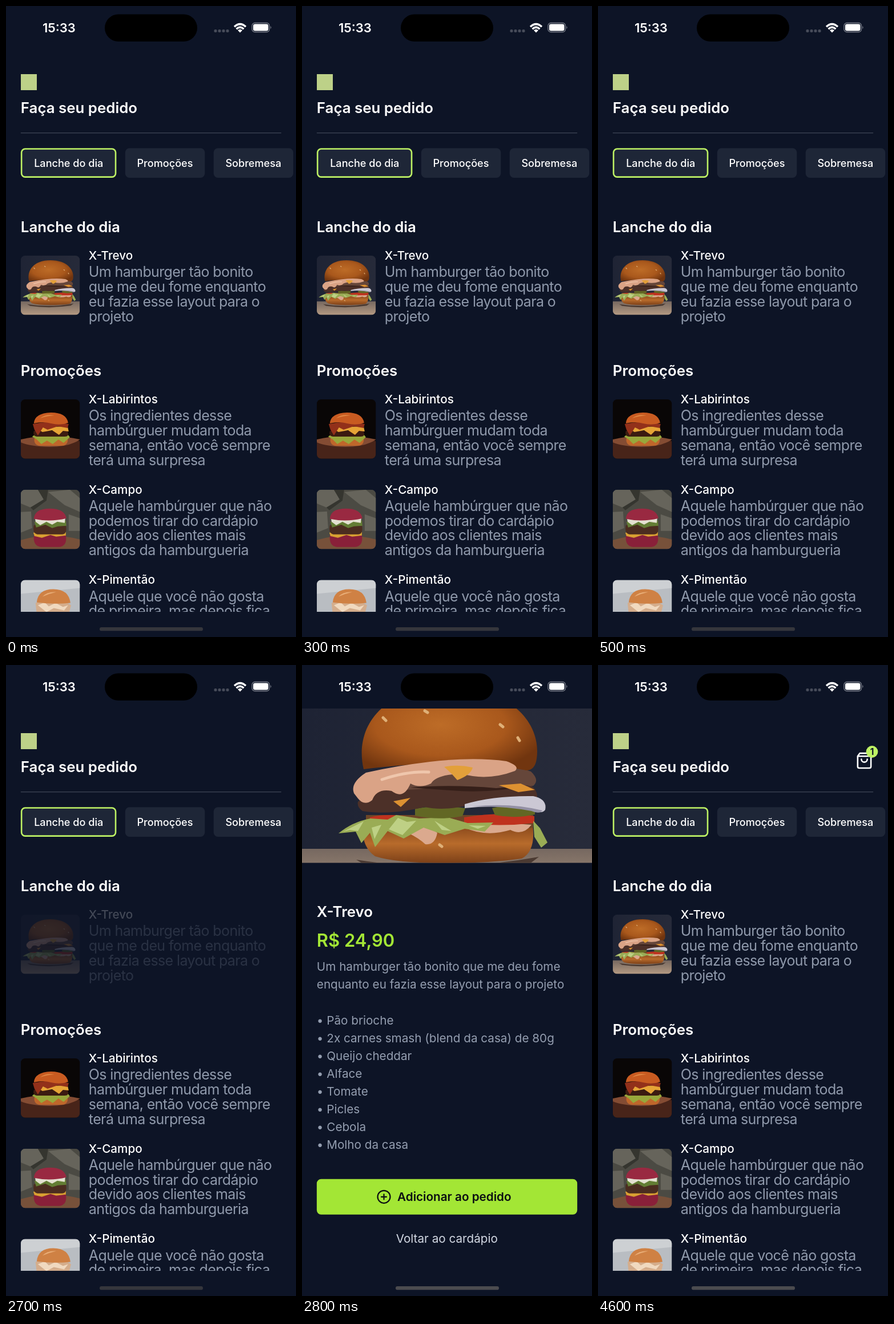
Recreate the animation shown at these times as an HTML page. Size 508 px wide and 1102 px high, loop 6.2 s.

```html
<!DOCTYPE html>
<html lang="pt-BR">
<head>
<meta charset="utf-8">
<title>Cardápio</title>
<style>
html, body { margin: 0; width: 100%; height: 100%; overflow: hidden; background: #0d1426; }
svg { display: block; }
text { font-family: Inter, sans-serif; font-optical-sizing: none; fill: #fff; white-space: pre; }
.h { font-size: 25.85px; font-weight: 600; }
.name { font-size: 20.68px; font-weight: 500; }
.tab { font-size: 18.1px; font-weight: 500; }
.desc { font-size: 25px; font-weight: 400; letter-spacing: -.62px; fill: #8f99ab; }
.body { font-size: 20.68px; fill: #949eb0; }
</style>
</head>
<body>
<svg id="stage" width="100%" height="100%" viewBox="0 0 508 1102"></svg>
<script>
const text = (x, y, cls, str, attrs = '') => `<text x="${x}" y="${y}" class="${cls}" ${attrs}>${str}</text>`;
const rect = (x, y, w, h, fill, r = 0, attrs = '') =>
  `<rect x="${x}" y="${y}" width="${w}" height="${h}" rx="${r}" fill="${fill}" ${attrs}/>`;
const path = (fill, d) => `<path fill="${fill}" d="${d}"/>`;
const lines = (x, y, step, cls, list) => list.map((s, i) => text(x, y + i * step, cls, s)).join('');

const left = 25.85;

const defs = `<defs>
  <clipPath id="thumb">${rect(0, 0, 103.4, 103.4, '#fff', 7.75)}</clipPath>
  <clipPath id="list">${rect(0, 330, 508, 728, '#fff')}</clipPath>
  <clipPath id="hero">${rect(0, 76, 508, 269.5, '#fff')}</clipPath>
  <radialGradient id="bun" cx=".45" cy=".45" r=".62">
    <stop stop-color="#bd6c27"/><stop offset=".6" stop-color="#a9581c"/><stop offset="1" stop-color="#71350f"/>
  </radialGradient>
  <linearGradient id="heel" x2="0" y2="1"><stop stop-color="#84451a"/><stop offset=".5" stop-color="#b86b2b"/><stop offset="1" stop-color="#7c4018"/></linearGradient>
  <linearGradient id="wall"><stop stop-color="#1e2334"/><stop offset="1" stop-color="#272b3a"/></linearGradient>
  <linearGradient id="table" x2="0" y2="1"><stop stop-color="#766860"/><stop offset="1" stop-color="#b89d84"/></linearGradient>
</defs>`;

const mainBurger = [
  rect(0, 0, 508, 330, 'url(#wall)'),
  rect(0, 321, 508, 100, 'url(#table)'),
  path('#4b3a32', 'M95 340Q250 365 415 335L395 350Q250 372 115 352Z'),
  path('url(#heel)', 'M106 278H404Q410 325 385 338Q330 346 250 346Q165 346 128 334Q104 318 106 278Z'),
  path('#6d4527', 'M112 262H405V284Q340 293 290 284Q200 298 112 282Z'),
  path('#dba98e', 'M180 285Q215 276 237 293Q233 315 216 313Q204 302 187 294ZM285 284Q350 274 402 279Q387 299 365 288Q322 301 285 284Z'),
  path('#bf321e', 'M119 266Q145 259 182 264L166 277Q137 279 119 274ZM284 266Q350 255 407 264V276Q345 283 284 276Z'),
  path('#9aac55', 'M64 294Q88 274 120 268L150 270L165 262L205 268L255 266L290 276L335 275L320 291L285 286L250 297L213 284L178 303L150 290L128 318L119 293L104 311L94 291ZM405 272L417 285L430 310L419 319L407 300Z'),
  path('#bed085', 'M72 291L108 273L98 290L84 288ZM152 287L168 267L184 274L200 272L176 297ZM232 272L262 290L245 288ZM292 280L322 281L308 286ZM122 284L139 279L127 304Z'),
  path('#626724', 'M198 251Q242 243 286 250L281 264Q239 272 198 263ZM333 250Q371 240 408 248V261Q373 269 338 262Z'),
  path('#4c3028', 'M98 239Q130 208 200 204L370 200Q414 207 412 232Q375 244 300 243Q250 256 215 248Q150 263 106 255Q96 248 98 239Z'),
  path('#65463a', 'M122 207Q180 179 280 183Q370 174 401 186Q417 201 405 211Q330 219 230 214Q160 224 122 207Z'),
  path('#351f19', 'M190 214Q260 208 340 215L400 210Q330 225 260 219Z'),
  path('#dd9131', 'M345 210L383 207L408 218L379 222ZM160 238L190 232L173 248Z'),
  path('#cbc8d4', 'M285 243Q335 228 405 229Q430 234 426 253Q420 261 402 254Q345 243 285 250Z'),
  path('#9390a4', 'M300 247Q365 240 421 254Q416 261 402 255Q355 246 300 247Z'),
  path('url(#bun)', 'M108 182C91 111 138 39 255 39C370 39 420 105 411 164Q408 184 393 184Q275 161 108 182Z'),
  path('#daa386', 'M91 224Q84 206 112 188Q165 176 224 169Q300 160 358 168Q383 177 373 185Q325 203 280 190Q235 191 226 207Q206 216 190 207Q178 236 157 220Q131 215 123 236Q109 247 98 233Z'),
  path('#e3a03a', 'M249 178Q273 173 299 179Q296 192 272 201Q260 187 249 178Z'),
  '<path d="M140 200Q185 185 222 187" fill="none" stroke="#efc6ac" stroke-width="5" stroke-linecap="round"/>',
  '<path d="M142 92l5 5M215 80l5 3M347 104l5 4M378 127l3 5M241 314l4 3" stroke="#dfb078" stroke-width="5" stroke-linecap="round"/>'
].join('');

const photos = [
  `<svg width="103.4" height="103.4" viewBox="51 7.5 406 406">${mainBurger}</svg>`,
  rect(0, 0, 104, 104, '#090606') +
    path('#482419', 'M0 73Q50 57 104 73V104H0Z') + path('#844c33', 'M0 70Q50 58 104 70Q85 83 50 83Q16 82 0 75Z') +
    path('#bf672b', 'M24 68H82Q84 80 72 81H34Q22 80 24 68Z') +
    path('#98a73b', 'M20 65L31 57H79L86 66L75 76L66 70L56 78L46 72L36 78L28 70Z') +
    path('#3b1b11', 'M23 55H82Q86 65 77 65H28Q20 64 23 55Z') +
    path('#e6a436', 'M25 49L82 47L84 56L74 55L67 62L55 54L38 57Z') +
    path('#92301a', 'M21 43Q52 36 84 43L82 50L65 47L47 53L39 49L30 63L24 53Z') +
    path('#c85b21', 'M23 42Q24 24 53 23Q80 23 83 41Q69 46 53 42Q39 38 23 42Z') +
    path('#e38b46', 'M34 33Q44 25 59 28Q44 29 34 33Z'),
  rect(0, 0, 104, 104, '#4b4a43') +
    path('#66645b', 'M0 0H30L42 18L17 31L0 24ZM48 4L86 0L104 15V39L77 27ZM0 39L18 38L20 67L0 75ZM84 43L104 50V72H84Z') +
    path('#35352f', 'M30 0H48L45 19L22 36L17 31L40 17Z') +
    path('#77513a', 'M0 88Q50 73 104 87V104H0Z') +
    path('#892039', 'M23 79H79Q82 99 67 100H35Q21 98 23 79Z') +
    path('#d9a032', 'M22 75L79 74L79 80L62 82L52 79L37 84L24 81Z') +
    path('#4b2d20', 'M23 62Q51 56 79 62Q82 77 73 78H29Q20 76 23 62Z') +
    path('#637d34', 'M24 56L79 54L80 63L65 64L55 67L43 61L27 66Z') +
    path('#e4e1d1', 'M25 50H78L77 58L64 56L55 61L45 56L34 62L26 56Z') +
    path('#992941', 'M23 51Q24 33 51 33Q77 33 80 50Q52 57 23 51Z'),
  rect(0, 0, 104, 104, '#b9bdc2') + path('#cdd0d3', 'M0 0H104V14L0 24Z') +
    path('#d4ad8c', 'M26 40L45 34L74 35L88 44L84 60H28Z') +
    path('#f0d9bf', 'M30 44L42 39L49 46L61 40L74 47L83 44L76 53L58 49L45 56Z') +
    path('#cf8144', 'M28 39Q30 16 57 16Q84 16 87 40Q57 43 28 39Z') +
    path('#e9ae78', 'M38 29Q46 20 62 21Q49 24 38 29Z')
];

const item = (i, y, name, desc) => `<g id="item${i}" transform="translate(${left} ${y})">
  <g clip-path="url(#thumb)">${photos[i]}</g>
  ${text(119, 6.7, 'name', name)}${lines(119, 37, 25.85, 'desc', desc)}</g>`;

// An active tab has a border that also pushes its label in.
const tab = (x, w, label, border = 0) =>
  rect(x + border / 2, 248.2 + border / 2, w - border, 51.7 - border, '#1e2637', 7.75 - border / 2,
    `stroke="#bef264" stroke-width="${border}"`) + text(x + 20.7 + border, 280.6, 'tab', label);

const firstName = 'X-Trevo';

const menu = `<g id="menu">
  ${rect(26, 119, 28, 28, '#bdd188')}
  ${text(left, 187, 'h', 'Faça seu pedido')}
  ${rect(left, 221, 456.3, 1.3, '#3c4454')}
  <g id="cart">
    <g transform="translate(451 151.5) scale(1.2926)" fill="none" stroke="#fff" stroke-width="2" stroke-linejoin="round" stroke-linecap="round">
      <path d="M6 2L3 6v14a2 2 0 0 0 2 2h14a2 2 0 0 0 2-2V6l-3-4zM3 6h18M16 10a4 4 0 0 1-8 0"/>
    </g>
    <circle cx="480" cy="151.5" r="10.4" fill="#bef264"/>
    ${text(480, 157, '', '1', 'text-anchor="middle" style="font-size:15.5px;font-weight:700;fill:#0d1426"')}
  </g>
  ${tab(left, 167.5, 'Lanche do dia', 2.6)}${tab(208.8, 139.5, 'Promoções')}${tab(363.7, 139.5, 'Sobremesa')}
  <g clip-path="url(#list)">
    ${text(left, 395, 'h', 'Lanche do dia')}
    ${item(0, 436, firstName, ['Um hamburger tão bonito', 'que me deu fome enquanto', 'eu fazia esse layout para o', 'projeto'])}
    ${text(left, 646, 'h', 'Promoções')}
    ${item(1, 687, 'X-Labirintos', ['Os ingredientes desse', 'hambúrguer mudam toda', 'semana, então você sempre', 'terá uma surpresa'])}
    ${item(2, 844.8, 'X-Campo', ['Aquele hambúrguer que não', 'podemos tirar do cardápio', 'devido aos clientes mais', 'antigos da hamburgueria'])}
    ${item(3, 1002.5, 'X-Pimentão', ['Aquele que você não gosta', 'de primeira, mas depois fica'])}
  </g>
</g>`;

const detail = `<g id="detail">
  <g clip-path="url(#hero)">${mainBurger}</g>
  ${text(left, 440, 'h', firstName)}
  ${text(left, 492, '', 'R$ 24,90', 'style="font-size:31px;font-weight:600;fill:#a3e635"')}
  ${lines(left, 534.3, 31, 'body', ['Um hamburger tão bonito que me deu fome', 'enquanto eu fazia esse layout para o projeto'])}
  ${lines(left, 627.5, 31, 'body', ['Pão brioche', '2x carnes smash (blend da casa) de 80g', 'Queijo cheddar', 'Alface', 'Tomate', 'Picles', 'Cebola', 'Molho da casa'].map(s => '• ' + s))}
  <g id="add">
    ${rect(left, 897.8, 456.3, 62, '#a3e635', 7.75)}
    <g fill="none" stroke="#0b0e12" stroke-width="2.2" stroke-linecap="round">
      <circle cx="143.5" cy="928.8" r="11"/><path d="M139 928.8h9M143.5 924.3v9"/>
    </g>
    ${text(167, 936.2, 'name', 'Adicionar ao pedido', 'style="font-weight:600;fill:#0b0e12"')}
  </g>
  ${text(253.8, 1009, 'body', 'Voltar ao cardápio', 'text-anchor="middle" style="fill:#d3d9e4"')}
</g>`;

const statusBar = text(64, 46, '', '15:33', 'style="font-size:22px;font-weight:600"') +
  rect(173, 14.5, 162, 47.5, '#000', 23.75) +
  [0, 1, 2, 3].map(i => rect(364.5 + i * 7, 41, 5, 5, '#474c5a', 1.8)).join('') +
  `<g fill="none" stroke="#fff" stroke-width="3.5">
    <path d="M400 36.3Q410 27 420 36.3M403.6 40.2Q410 34.2 416.4 40.2"/>
  </g>` + path('#fff', 'M406 42.5Q410 39 414 42.5L410 46.5Z') +
  rect(431, 29.5, 30.5, 16, 'none', 5, 'stroke="#777c88" stroke-width="1.3"') +
  rect(433, 31.5, 26.5, 12, '#fff', 3.3) + path('#777c88', 'M463.3 35Q466 37.5 463.3 40Z');

const $ = id => document.getElementById(id);
$('stage').innerHTML = defs + rect(0, 0, 508, 1102, '#0d1426') + menu + detail + statusBar +
  rect(164, 1085, 181, 6.3, '#35363c', 3.15, 'id="homeBar"');

const show = (id, on) => $(id).setAttribute('display', on ? 'inline' : 'none');

function draw(now) {
  const t = now % 6200;
  const inDetail = t >= 2800 && t < 4600;
  show('menu', !inDetail);
  show('detail', inDetail);
  show('cart', t >= 4600);
  $('item0').setAttribute('opacity', t >= 2700 && t < 2800 ? .22 : 1);
  $('add').setAttribute('opacity', t >= 4400 ? .7 : 1);
  $('homeBar').setAttribute('fill', t >= 2800 ? '#4b4b4f' : '#35363c');
}

const start = performance.now();
(function tick() {
  draw(performance.now() - start);
  requestAnimationFrame(tick);
})();
</script>
</body>
</html>
```
